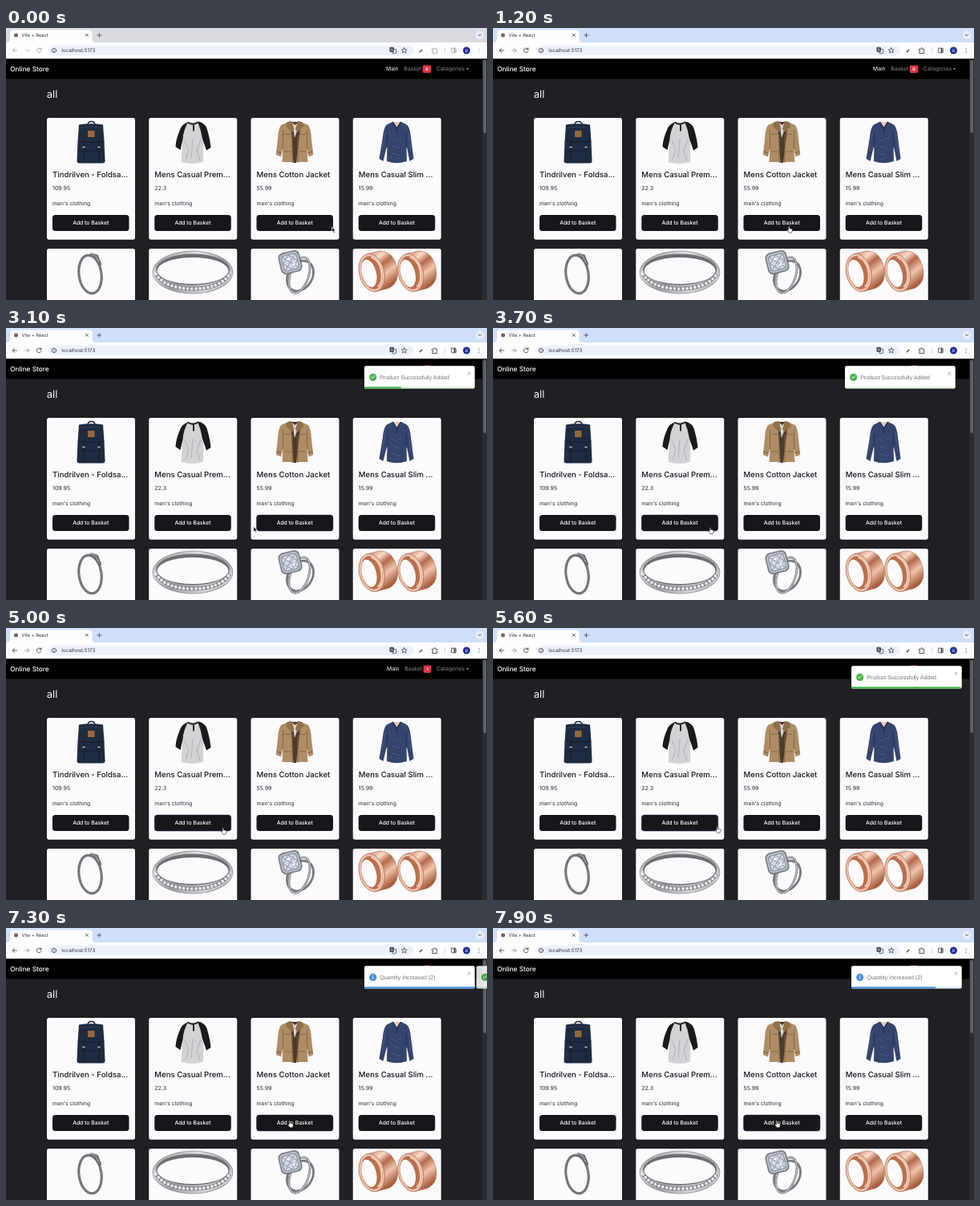
Recreate the animation shown at these times as an HTML page. Size 600 by 339 pixels, loop 8000 ms.

```html
<!DOCTYPE html>
<html lang="en">
<head>
<meta charset="utf-8">
<title>Online Store</title>
<style>
html, body { margin: 0; width: 100%; height: 100%; overflow: hidden; background: #201f23; }
svg { display: block; width: 600px; height: 339px; }
text { font: 7px Inter, sans-serif; text-rendering: geometricPrecision; white-space: pre; }
.title { font-size: 9.6px; font-weight: 500; fill: #17161b; }
.info { font-size: 6.8px; fill: #2b2a2f; }
.price { font-size: 7.1px; }
.label { font-size: 6.8px; font-weight: 500; fill: #fff; text-anchor: middle; }
.nav { font-size: 6.8px; fill: #8b8b8b; }
.toast { font: 7px "Liberation Sans", sans-serif; fill: #757575; }
.line { fill: none; stroke: #42464d; stroke-linecap: round; stroke-linejoin: round; }
</style>
</head>
<body>
<svg viewBox="0 0 600 339">
  <defs>
    <linearGradient id="steel" x2="1" y2="1">
      <stop stop-color="#777"/><stop offset=".3" stop-color="#e4e4e6"/>
      <stop offset=".55" stop-color="#9a9ca0"/><stop offset=".8" stop-color="#d6d6d8"/><stop offset="1" stop-color="#666"/>
    </linearGradient>
    <linearGradient id="rose" x2=".3" y2="1">
      <stop stop-color="#d08e6e"/><stop offset=".25" stop-color="#f8dccb"/>
      <stop offset=".45" stop-color="#b4694b"/><stop offset=".7" stop-color="#f0c4ac"/><stop offset="1" stop-color="#a9603f"/>
    </linearGradient>
    <filter id="shadow" x="-10%" y="-30%" width="120%" height="170%">
      <feDropShadow dx="0" dy=".6" stdDeviation="1.4" flood-opacity=".3"/>
    </filter>
  </defs>

  <rect width="600" height="339" fill="#201f23"/>

  <!-- browser window -->
  <rect id="strip" width="600" height="22"/>
  <path d="M1 18Q5 18 5 14V6Q5 2.500 9 2.500H103.500Q107.500 2.500 107.500 6V14Q107.500 18 111.500 18H600V38.500H0V18Z" fill="#fdfdff"/>
  <circle cx="12.500" cy="9" r="2.500" fill="#7b6557"/>
  <text x="19.500" y="11.100" style="font-size:5.8px" fill="#30333a">Vite + React</text>
  <path class="line" d="M99.200 7.300l3.200 3.200m0-3.200l-3.200 3.200M113.800 9h5m-2.500-2.500v5" stroke-width=".8"/>
  <circle cx="591" cy="8.700" r="5.200" fill="#e9eff9"/>
  <path class="line" d="M589.300 8l1.700 1.700 1.700-1.700" stroke-width="1"/>
  <rect x="53" y="22" width="455" height="12" rx="6" fill="#edf1fa"/>
  <g id="tools" class="line" stroke-width=".8">
    <path d="M13.500 28H8.200m2.400-2.500L8.200 28l2.400 2.500" stroke-width=".9"/>
    <path d="M23.500 28h5.300m-2.400-2.500l2.400 2.500-2.400 2.500" stroke-width=".9" opacity=".5"/>
    <path d="M43.800 26.500a2.900 2.900 0 1 0 .2 2.400M44 24.800v2h-2" stroke-width=".9"/>
    <path d="M531.800 26.200h2v-.6a.9.9 0 0 1 1.800 0v.6h2v5.300h-5.800v-1.700a.9.900 0 0 0 0-1.800z" stroke-width=".9"/>
    <rect x="555.500" y="25.200" width="5.800" height="5.600" rx=".7"/><path d="M559.600 25.700v4.600" stroke-width="1.900"/>
    <path d="M590 25.500v.01M590 28v.01M590 30.500v.01" stroke-width="1.200"/>
  </g>
  <g class="line" stroke-width=".8">
    <circle cx="63" cy="28" r="2.700" transform="translate(-3)"/><path d="M60 28v1.200M60 26.700v.1"/>
    <rect x="482" y="26.300" width="4.600" height="5.400" rx=".5"/>
    <rect x="478.900" y="24.300" width="4.600" height="5.200" rx=".5" fill="#42464d"/>
    <path d="M482.200 26.200a1.200 1.200 0 1 0 .2 1.200h-1" stroke-width=".5" style="stroke:#fff"/>
    <path d="M496.800 24.600l1 2.200 2.400.2-1.800 1.600.6 2.400-2.200-1.300-2.200 1.300.6-2.400-1.800-1.600 2.400-.2z"/>
    <path d="M516.300 29.800l2.600-2.600" stroke-width="1.300"/>
    <path d="M547.500 24.500v7" style="stroke:#c9d4ea"/>
  </g>
  <text x="69.300" y="30.400" style="font-size:6.250px" fill="#2c2f36">localhost:5173</text>
  <circle cx="574.500" cy="28" r="4.500" fill="#24309b"/>
  <text x="574.500" y="29.700" style="font-size:4.600px" fill="#fff" text-anchor="middle">B</text>

  <!-- page header -->
  <rect y="38.500" width="600" height="25" fill="#000"/>
  <text x="5.200" y="53.500" style="font-size:8.250px;font-weight:500" fill="#fff">Online Store</text>
  <g id="menu">
    <text class="nav" x="474" y="53.200" style="fill:#fff">Main</text>
    <text class="nav" x="496.500" y="53.200">Basket</text>
  </g>
  <rect id="badge" y="46.600" height="9.400" rx="2" fill="#dc3545"/>
  <text id="count" class="label" y="53.100" style="font-size:5.200px;font-weight:700"></text>
  <text class="nav" x="537" y="53.200">Categories</text>
  <path d="M573.700 50h3.800l-1.900 1.900z" fill="#8b8b8b"/>
  <text x="50.700" y="87" style="font-size:13px" fill="#f1f1f3">all</text>
  <rect x="594" y="38.500" width="6" height="300.500" fill="#2c2b2c"/>
  <rect x="595.300" y="40" width="3.700" height="91" rx="1.800" fill="#626163"/>

  <g id="cards"></g>

  <!-- backpack -->
  <g>
    <path d="M102 121q0-4.500 4.500-4.500t4.500 4.500" fill="none" stroke="#1b2536" stroke-width="1.400"/>
    <path d="M91 120.500q15-2.500 30 0l1.500 21 1 24q0 3-3 3H91.500q-3 0-3-3l1-24z" fill="#1f2b40"/>
    <path d="M89.500 141q16.500 3 33 0M97 142v26M116 142v26M93 153h27" fill="none" stroke="#131b2a" stroke-width=".9"/>
    <path d="M93 124q13-2 26 0" fill="none" stroke="#35445f" stroke-width=".8"/>
    <rect x="102" y="128" width="8.500" height="8" rx=".8" fill="#95683d"/>
    <path d="M95.500 148.500h3M114.500 148.500h3" stroke="#c3c6cc" stroke-width="1.300"/>
  </g>

  <!-- raglan shirt -->
  <g>
    <path d="M224 118.500L243 117L246.500 134L246 167Q232 171 218.500 167L220 142L219 128Z" fill="#d3d3d6"/>
    <path d="M227 117.500Q219 120 217 127Q212 138 211.500 148L217.500 152L220.500 139Q221 128 227 117.500Z" fill="#1a1a1d"/>
    <path d="M239 116.500Q248 118 250.500 125Q254.500 138 255.500 149L250 152.500L245 138Q243 126 239 116.500Z" fill="#1a1a1d"/>
    <path d="M226.500 117.500q6.500 4.500 13 0" fill="none" stroke="#1a1a1d" stroke-width="1.800"/>
    <path d="M234 119v9.500" stroke="#2a2a2d" stroke-width="2"/>
    <path d="M223 140l5 12-4 12M243 139l-5 14 4 12M233 138l-2 24" fill="none" stroke="#b6b6bb" stroke-width="1.200"/>
  </g>

  <!-- jacket -->
  <g>
    <path d="M351 117.500L343 121Q339.500 126 339 138L336.800 158L343 160.500L345.500 150L344.500 167H376.500L375.500 150L377.500 160.500L383.300 158L381 138Q380.500 126 377 121L369 117.500Z" fill="#ae8d66"/>
    <path d="M355 117h10l2 9-5 42h-3.500z" fill="#4b3b2d"/>
    <path d="M357 118l3.500 3 3.500-3-1.500 12-2.500 7z" fill="#d5d4d3"/>
    <path d="M351 117l5-1 3.500 10-3 4-7.500-8zM369 117l-5-1-3 10 3 4 7.500-8z" fill="#90704a"/>
    <path d="M345.500 127v24M375.500 127v24M347 132.500h9M365 132.500h9M346 154h10M365 154h10M357 132v36M364 133v35" fill="none" stroke="#846644" stroke-width=".9"/>
    <path d="M337.500 154l6 2M376.500 156l6-2" stroke="#80603d" stroke-width="1.200"/>
  </g>

  <!-- long sleeve shirt -->
  <g>
    <path d="M482 117L475 120.500Q471 124 470 136L465.500 163L470.500 166L475.500 146L475 166Q487 170.500 500 166L499.500 146L503.500 166L508.500 163L505 136Q504 124 500 120.500L493 117Z" fill="#35446c"/>
    <path d="M483 117l4.500 7 4.500-7z" fill="#e5cbb9"/>
    <path d="M482.500 117l5 8 5-8M487.500 125v7" fill="none" stroke="#232d50" stroke-width="1.200"/>
    <path d="M475.500 131v18M499.500 131v18" fill="none" stroke="#232d50" stroke-width=".8"/>
    <path d="M480 138l7 3M482 147l9 3M481 156l10 3M483 164l8-2M494 136l-5 3M473 130l-4 24M502 130l3 24" fill="none" stroke="#4d5e8a" stroke-width=".8"/>
  </g>

  <!-- bracelet -->
  <g fill="none" transform="rotate(-8 105 307)">
    <ellipse cx="105" cy="307" rx="14" ry="24" stroke="#5e5f63" stroke-width="3"/>
    <ellipse cx="105" cy="307" rx="14" ry="24" stroke="#a5a6aa" stroke-width="1.800" stroke-dasharray=".8 1.100"/>
    <path d="M110 283l6 3 2.500 10" stroke="#6d6f74" stroke-width="4.500" stroke-linecap="round"/>
    <path d="M110 282l5 3 3 9" stroke="#d5d6d8" stroke-width="1.200" stroke-dasharray="1.500 1.500"/>
  </g>

  <!-- diamond band -->
  <g>
    <ellipse cx="233" cy="304.500" rx="50" ry="26.500" fill="url(#steel)" stroke="#707175" stroke-width=".6"/>
    <ellipse cx="233" cy="301" rx="46" ry="19.500" fill="#6d6e72"/>
    <ellipse cx="233" cy="302.500" rx="44.500" ry="16.500" fill="#fcfafd"/>
    <path d="M187 307Q200 325 233 325T279 307" fill="none" stroke="#85878b" stroke-width="5"/>
    <path d="M187 307Q200 325 233 325T279 307" fill="none" stroke="#ececf0" stroke-width="3.700" stroke-dasharray="0 5" stroke-linecap="round"/>
  </g>

  <!-- solitaire ring -->
  <g>
    <g fill="none" stroke="#777a80" stroke-width="2.800">
      <ellipse id="hoop" cx="366" cy="308" rx="11.500" ry="23" transform="rotate(18 366 308)"/>
      <ellipse cx="367" cy="309" rx="15" ry="20" transform="rotate(32 367 309)"/>
    </g>
    <use href="#hoop" fill="none" stroke="#dfe0e4" stroke-width="1.400" stroke-dasharray="1.500 .8"/>
    <g transform="translate(354.500 292) rotate(-14)">
      <rect x="-13" y="-13" width="26" height="26" rx="6" fill="#8d929b" stroke="#62666e" stroke-width="1.500" stroke-dasharray="1.300 .7"/>
      <rect x="-11" y="-11" width="22" height="22" rx="5" fill="none" stroke="#d9dbe0" stroke-width="1.800" stroke-dasharray="1.300 .8"/>
      <rect x="-9" y="-9" width="18" height="18" rx="4" fill="#d3d9e4"/>
      <path d="M-8-8L8 8M8-8L-8 8M0-9L9 0 0 9-9 0z" fill="none" stroke="#8790a0" stroke-width=".9"/>
      <path d="M-5-4l4-2 1 3zM2 3l4-1-2 4z" fill="#fff"/>
    </g>
  </g>

  <g id="rose-rings"></g>
  <g id="rings"></g>
  <g id="toasts"></g>

  <g id="cursor" stroke-width=".7" stroke-linejoin="round">
    <path id="arrow" d="M0 0v6.600l1.600-1.400 1.100 2.500 1.200-.5-1.100-2.400h2.100z" fill="#111" stroke="#fff"/>
    <path id="hand" transform="scale(.88)" d="M-.8.3Q0-.5.8.3V3.100Q1.700 2.500 2.300 3.200 3.200 2.800 3.600 3.700 4.700 3.600 4.700 4.700V6.200Q4.500 8 3.500 9H.2L-2.700 5.400Q-2.900 4.200-1.900 4.300L-.8 5.200Z" fill="#fff" stroke="#222"/>
  </g>
</svg>
<script>
const $ = id => document.getElementById(id);
const CYCLE = 8000, PX = 0.433;          // PX: stage pixels per page pixel
const clamp = p => Math.max(0, Math.min(1, p));
const easeOut = p => 1 - (1 - p) ** 3;
const ease = p => 1 - (1 - p ** 1.3) ** 2.4;
const smooth = p => p * p * (3 - 2 * p);

// Value of a list of [time, value] stops
function track(stops, t, curve = p => p) {
  const i = stops.findIndex(s => s[0] > t);
  if (i < 0) return stops.at(-1)[1];
  if (i === 0) return stops[0][1];
  const [t0, a] = stops[i - 1], [t1, b] = stops[i];
  return a + (b - a) * curve((t - t0) / (t1 - t0));
}

const products = [
  ["Tindrilven - Foldsa...", "109.95"],
  ["Mens Casual Prem...", "22.3"],
  ["Mens Cotton Jacket", "55.99"],
  ["Mens Casual Slim ...", "15.99"]
];
const cardX = i => 51 + 127.25 * i;

$("cards").innerHTML = products.map(([name, price], i) => `
  <g transform="translate(${cardX(i)})">
    <rect y="112" width="110" height="151.700" rx="2.600" fill="#fcfafd"/>
    <rect y="275" width="110" height="90" rx="2.600" fill="#fcfafd"/>
    <text class="title" x="7" y="186.300">${name}</text>
    <text class="info price" x="7" y="201.700">${price}</text>
    <text class="info" x="7" y="220.900">men's clothing</text>
    <rect x="7" y="233" width="95.500" height="20" rx="3.500" fill="#17161b"/>
    <text class="label" x="54.700" y="245.400">Add to Basket</text>
  </g>`).join("");

$("rose-rings").innerHTML = [0, 48.5].map(dx => `
  <g transform="translate(${dx}) rotate(-14 464 303)">
    <path d="M456 279H472Q488 283 488 303T472 327H456Z" fill="url(#rose)" stroke="#a9674b" stroke-width=".5"/>
    <ellipse cx="456" cy="303" rx="15.500" ry="24" fill="#efc3ac" stroke="#a9674b" stroke-width=".7"/>
    <ellipse cx="456" cy="303" rx="13" ry="21" fill="#b9704f"/>
    <path d="M460 284Q469 290 468 304T459 322" fill="none" stroke="#f3cdb8" stroke-width="2"/>
    <ellipse cx="452.500" cy="303" rx="9" ry="17.500" fill="#fcfafd"/>
  </g>`).join("");

$("rings").innerHTML = products.map((_, i) =>
  `<rect x="${cardX(i) + 7}" y="233" width="95.500" height="20" rx="3.500" fill="none" stroke="#1f2856" stroke-width=".5"/>`).join("");

const green = "#45b649", blue = "#4a90d9";
const tick = "M455.500 61.200l1.500 1.500 2.700-3.200", letterI = "M457.500 60.800v2.600M457.500 58.700v.1";
const toasts = [
  { start: 1400, text: "Product Successfully Added", color: green, icon: tick },
  { start: 4885, text: "Product Successfully Added", color: green, icon: tick },
  { start: 6845, text: "Quantity Increased (2)", color: blue, icon: letterI }
];
const MOVE = 700, STAY = 1500;

$("toasts").innerHTML = toasts.map(({ text, color, icon }) => `
  <g>
    <rect x="447" y="47.200" width="137.700" height="28.300" rx="2" fill="#fff" filter="url(#shadow)"/>
    <circle cx="457.700" cy="61.400" r="4.600" fill="${color}"/>
    <path d="${icon}" fill="none" stroke="#fff" stroke-width=".9" stroke-linecap="round"/>
    <text class="toast" x="466.200" y="63.600">${text}</text>
    <path d="M575.600 54.800l3.600 3.600m0-3.600l-3.600 3.600" stroke="#8a8a8a" stroke-width=".7"/>
    <rect x="447" y="73.300" width="137.700" height="2.200" fill="${color}" opacity=".2"/>
    <rect x="447" y="73.300" height="2.200" fill="${color}"/>
  </g>`).join("");

const enter = [[0, 3000], [420, -25], [525, 10], [630, -5], [700, 0]];
const leave = [[0, 0], [140, -20], [700, 2000]];

function drawToast(node, { start }, t) {
  const age = t - start, out = age - MOVE - STAY;
  const shown = age >= 0 && out < MOVE;
  node.style.display = shown ? "" : "none";
  if (!shown) return;
  const x = out < 0 ? track(enter, age, easeOut) : track(leave, out, ease);
  node.setAttribute("transform", `translate(${x * PX})`);
  node.setAttribute("opacity", 1 - clamp((out - 140) / 560));
  node.lastElementChild.setAttribute("width", 137.7 * (1 - clamp((age - MOVE) / STAY)));
}

const pathX = [[0, 406.5], [150, 406.5], [1050, 369.3], [1500, 369.3], [2300, 362], [2600, 362], [3500, 271], [5400, 270.7], [6350, 349.8], [6550, 349.8], [6800, 354]];
const pathY = [[0, 248], [150, 248], [1050, 247.3], [1500, 247.3], [2300, 245.8], [2600, 245.8], [3500, 248.7], [5000, 249.2], [5400, 249.2], [6350, 233.5], [6550, 233.5], [6800, 240.8]];

function drawCursor(t) {
  const x = track(pathX, t, smooth), y = track(pathY, t, smooth);
  const local = (x - cardX(0)) % 127.25;
  const over = t > 200 && local > 7 && local < 102.5 && y > 233 && y < 253;
  $("cursor").setAttribute("transform", `translate(${x} ${y})`);
  $("hand").style.display = over ? "" : "none";
  $("arrow").style.display = over ? "none" : "";
}

function drawBasket(t) {
  const count = t < 1400 ? 0 : t < 5050 ? 1 : 2;
  const shift = count === 1 ? 1 : 0;
  $("menu").setAttribute("transform", `translate(${shift})`);
  $("badge").setAttribute("x", 519.6 + shift);
  $("badge").setAttribute("width", 10.8 - shift);
  $("count").setAttribute("x", 525 + shift / 2);
  $("count").textContent = count;
}

// The window is inactive until it is first clicked
function drawWindow(t) {
  const active = t >= 300;
  $("strip").setAttribute("fill", active ? "#cfdffa" : "#dadbe0");
  $("tools").setAttribute("opacity", active ? 1 : 0.45);
}

function draw(now) {
  const t = now % CYCLE;
  drawWindow(t);
  drawBasket(t);
  drawCursor(t);
  toasts.forEach((toast, i) => drawToast($("toasts").children[i], toast, t));
  const focus = t < 1350 ? -1 : t < 3500 ? 2 : t < 5800 ? 1 : t < 6800 ? -1 : 2;
  [...$("rings").children].forEach((ring, i) => ring.style.display = i === focus ? "" : "none");
  requestAnimationFrame(draw);
}
draw(performance.now());
</script>
</body>
</html>
```
